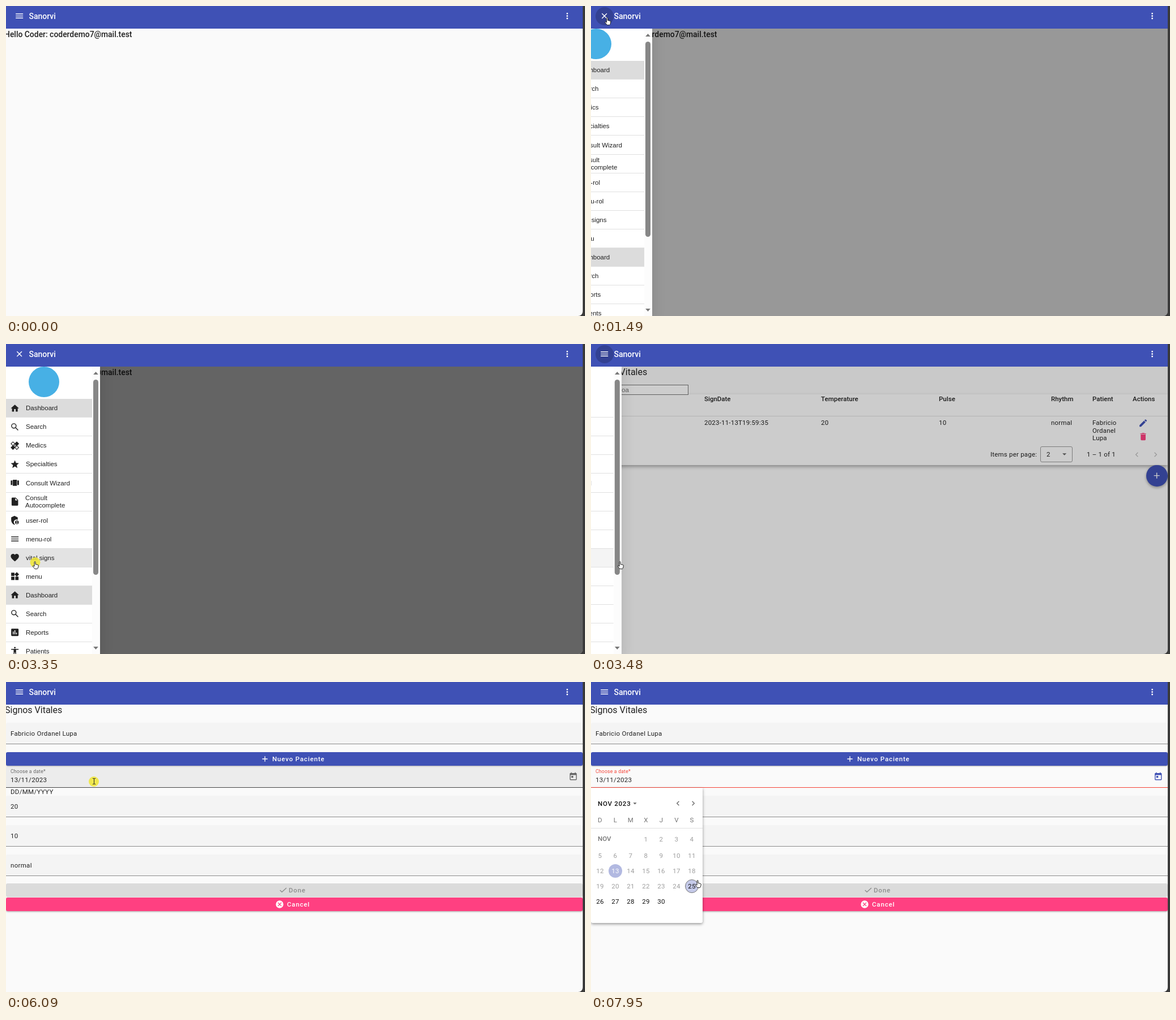
An HTML page for the animation above (8 s loop, 1022 by 548 pixels).

```html
<!DOCTYPE html>
<html lang="en">
<head>
<meta charset="utf-8">
<title>Vital signs</title>
<style>
html, body { margin: 0; width: 100%; height: 100%; overflow: hidden; background: #3a3a3a; }
#app { position: absolute; left: 0; top: 0; width: 1018px; height: 548px; overflow: hidden;
  background: #fafafa; border-radius: 0 0 8px 0; color: #212121; font: 11.5px/20px Roboto, sans-serif; }
#app div, #app span, #app svg, #cursor, #cursor svg { position: absolute; }
#app span { white-space: pre; }
.layer { left: 0; top: 0; width: 1018px; height: 548px; }
.bar { left: 0; top: 0; width: 1018px; height: 40px; background: #3f51b5; color: #fff; }
.ring { left: 8px; top: 2px; width: 32px; height: 32px; border-radius: 50%; background: rgba(0,0,0,.19); }
.med { font-weight: 500; }
.cell { letter-spacing: .2px; }
.form { letter-spacing: .3px; }
.btn { font-weight: 500; letter-spacing: .85px; }
.small { font-size: 8.6px; letter-spacing: .23px; }
.mid { transform: translateX(-50%); letter-spacing: .3px; }
#drawer { left: 0; top: 40px; width: 166px; height: 508px; background: #fff;
  box-shadow: 0 4px 20px 3px rgba(0,0,0,.1); font-family: "Liberation Sans", Arial, sans-serif; }
.row { left: 0; width: 152px; height: 32px; border-bottom: 1px solid #e0e0e0; }
.field { left: 0; width: 1018px; height: 37px; background: #f4f4f4; border-bottom: 1px solid #8c8c8c;
  border-radius: 3px 3px 0 0; }
.wide { left: 0; width: 1018px; height: 24px; border-radius: 3px; }
.card { left: 0; top: 89px; width: 1018px; height: 125px; background: #fefefe;
  box-shadow: 0 3px 6px rgba(0,0,0,.32); }
.filter { left: 24px; top: 72px; width: 146px; height: 16px; background: #fff; border: 1px solid #767676; }
.fab { left: 980px; top: 214px; width: 38px; height: 38px; border-radius: 50%; background: #3f51b5;
  box-shadow: 0 2px 5px rgba(0,0,0,.35); }
#edit { left: 956px; top: 127px; width: 43px; height: 25px; border-radius: 3px; overflow: hidden; background: #e4e7f4; }
#ripple { border-radius: 50%; background: #d6daef; }
#calendar { left: 0; top: 187px; width: 197px; height: 239px; background: #fff; border-radius: 0 0 3px 3px;
  box-shadow: 0 2px 5px rgba(0,0,0,.4); transform-origin: 0 0; }
.day { width: 24px; height: 24px; border-radius: 50%; box-sizing: border-box; }
#cursor { left: 0; top: 0; }
#cursor svg { overflow: visible; }
#halo { position: absolute; left: -9px; top: -8px; width: 18px; height: 18px; border-radius: 50%;
  background: rgba(240,230,50,.85); }
</style>
</head>
<body>
<div id="app"></div>
<div id="cursor"></div>
<script>
const $ = id => document.getElementById(id);
const BLUE = '#3f51b5', PINK = '#ff4081', RED = '#f44336', INK = '#212121';

// Icons on a 24-unit grid; those starting with "~" are stroked.
const ICONS = {
  menu: 'M3 6h18v2H3zM3 11h18v2H3zM3 16h18v2H3z',
  close: '~M6 6l12 12M6 18L18 6',
  more: 'M10 6a2 2 0 1 1 4 0 2 2 0 1 1-4 0M10 12a2 2 0 1 1 4 0 2 2 0 1 1-4 0M10 18a2 2 0 1 1 4 0 2 2 0 1 1-4 0',
  home: 'M10 20v-6h4v6h5v-8h3L12 3 2 12h3v8z',
  search: '~M4 9.5a5.5 5.5 0 1 1 11 0 5.5 5.5 0 1 1-11 0M14 14l6 6',
  healing: 'M12 6.3l4.7-4.7 5.7 5.7-4.7 4.7 4.7 4.7-5.7 5.7-4.7-4.7-4.7 4.7-5.7-5.7L6.3 12 1.6 7.3l5.7-5.7z' +
    'M3.7 7.3L7.3 11l3.6-3.7-3.6-3.6zM13 16.7l3.7 3.6 3.6-3.6-3.6-3.6zM9 11h2v2H9zM13 11h2v2h-2zM11 9h2v2h-2zM11 13h2v2h-2z',
  star: 'M12 17.3L18.2 21l-1.7-7L22 9.2l-7.2-.6L12 2 9.2 8.6 2 9.2 7.5 14 5.8 21z',
  carousel: 'M7 4h10v15H7zM2 6h4v11H2zM18 6h4v11h-4z',
  file: 'M6 2q-2 0-2 2v16q0 2 2 2h12q2 0 2-2V8l-6-6zM13 9V3.5L18.5 9z',
  shield: 'M11 1L3 5v6c0 5 3 10 8 12q1 0 1.5-1A6 6 0 0 1 19 11V5zM12.5 17a4.5 4.5 0 1 1 9 0 4.5 4.5 0 1 1-9 0M17 14a1.3 1.3 0 1 0 .1 0M14.5 19q2.5-2 5 0-2.5 2.5-5 0',
  heart: 'M12 21.3C5.4 15.4 2 12.3 2 8.5 2 3 9 1 12 5.1 15 1 22 3 22 8.5c0 3.8-3.4 6.9-10 12.8z',
  widgets: 'M13 13h8v8h-8zM3 13h8v8H3zM3 3h8v8H3zM16.7 1.7L22.3 7.3 16.7 13 11 7.3z',
  chart: 'M5 3h14q2 0 2 2v14q0 2-2 2H5q-2 0-2-2V5q0-2 2-2zM7 10v7h2v-7zM11 7v10h2V7zM15 13v4h2v-4z',
  person: 'M10 4a2 2 0 1 1 4 0 2 2 0 1 1-4 0M3 7h18v2h-6v13h-2v-6h-2v6H9V9H3z',
  edit: 'M3 17.3V21h3.8L17.8 9.9l-3.7-3.7zM20.7 7q.8-.7 0-1.4l-2.3-2.3q-.7-.7-1.4 0l-1.9 1.8 3.8 3.8z',
  bin: 'M6 7h12v12q0 2-2 2H8q-2 0-2-2zM5 4h3.5l1-1h5l1 1H19v2H5z',
  plus: '~M12 5v14M5 12h14',
  done: '~M4 12l5 5L21 6',
  cancel: 'M2 12a10 10 0 1 1 20 0 10 10 0 1 1-20 0M8 6.6L6.6 8l4 4-4 4L8 17.4l4-4 4 4 1.4-1.4-4-4 4-4L16 6.6l-4 4z',
  today: 'M5 3h1V1h2v2h8V1h2v2h1q2 0 2 2v14q0 2-2 2H5q-2 0-2-2V5q0-2 2-2zM5 8v11h14V8zM7 10h5v5H7z',
  down: 'M7 10l5 5 5-5z',
  up: 'M5 16l7-8 7 8z',
  dropup: 'M5 8l7 8 7-8z',
  prev: '~M15 6l-6 6 6 6',
  next: '~M9 6l6 6-6 6'
};

const text = (x, y, s, cls = '', css = '') =>
  `<span class="${cls}" style="left:${x}px;top:${y - 10}px;${css}">${s}</span>`;
const box = (cls, css, id = '', inner = '') => `<div id="${id}" class="${cls}" style="${css}">${inner}</div>`;
function icon(name, x, y, color = INK, size = 17.3, id = '') {
  const stroked = ICONS[name][0] === '~';
  const paint = stroked ? 'fill="none" stroke="currentColor" stroke-width="2"' : 'fill="currentColor" fill-rule="evenodd"';
  return `<svg id="${id}" viewBox="0 0 24 24" width="${size}" height="${size}" style="left:${x - size / 2}px;` +
    `top:${y - size / 2}px;color:${color}"><path ${paint} d="${ICONS[name].replace('~', '')}"/></svg>`;
}

const PATIENT = ['Fabricio', 'Ordanel', 'Lupa'];
const MENU = [['home', 'Dashboard'], ['search', 'Search'], ['healing', 'Medics'], ['star', 'Specialties'],
  ['carousel', 'Consult Wizard'], ['file', 'Consult\nAutocomplete'], ['shield', 'user-rol'], ['menu', 'menu-rol'],
  ['heart', 'vital signs'], ['widgets', 'menu'], ['home', 'Dashboard'], ['search', 'Search'],
  ['chart', 'Reports'], ['person', 'Patients']];
const ROW = 33.03;

const homePage = text(-3, 50, 'Hello Coder: coderdemo7@mail.test', 'med', 'font-size:13.9px');
const title = text(-2, 50, 'Signos Vitales', '', 'font-size:16px');

function tablePage() {
  const columns = [[8, 'ID', '3'], [200, 'SignDate', '2023-11-13T19:59:35'], [406, 'Temperature', '20'],
    [614, 'Pulse', '10'], [812, 'Rhythm', 'normal'], [885, 'Patient', ''], [956, 'Actions', '']];
  return title + text(-2, 81, 'Filter') + box('card', '') + box('filter', '') +
    text(26, 81, 'Ex. Noa', '', 'color:#757575;font-family:Liberation Sans,Arial,sans-serif') +
    box('', 'left:0;top:127px;width:1018px;height:1px;background:#dedede') +
    columns.map(([x, head, value]) => text(x, 97, head, 'med') + text(x, 139, value, 'cell')).join('') +
    PATIENT.map((s, i) => text(885, 139 + 13.6 * i, s, 'cell')).join('') +
    box('', '', 'edit', box('', '', 'ripple')) +
    icon('edit', 974.5, 139.5, BLUE) + icon('bin', 974.5, 164, PINK) +
    text(705, 195, 'Items per page:', 'cell') +
    box('', 'left:793px;top:181px;width:55px;height:26px;border:1px solid #9a9a9a;border-radius:3px') +
    text(804, 195, '2', 'cell') + icon('down', 836, 195, '#666') + text(875, 195, '1 – 1 of 1', 'cell') +
    icon('prev', 963, 195, '#bdbdbd', 15) + icon('next', 996, 195, '#bdbdbd', 15) +
    box('fab', '') + icon('plus', 999, 233, '#fff');
}

const FIELDS = [[72, PATIENT.join(' ')], [149, ''], [201, '20'], [253, '10'], [305, 'normal']];
function formPage() {
  return title +
    FIELDS.map(([y, s], i) => box('field', `top:${y}px`, 'field' + i) + text(8, y + 18.5, s, 'form')).join('') +
    box('wide', `top:124px;background:${BLUE};box-shadow:0 1px 2px rgba(0,0,0,.3)`) +
    icon('plus', 457, 136, '#fff', 16) + text(470, 136, 'Nuevo Paciente', 'btn', 'color:#fff') +
    `<span id="label" class="small" style="left:8px;top:148px">Choose a date*</span>` +
    text(8, 173, '13/11/2023', 'form') + icon('today', 1001.5, 167, '#666', 16.5, 'toggle') +
    text(8, 193.5, 'DD/MM/YYYY', 'form') +
    box('wide', 'top:356px;background:#dbdbdb') + icon('done', 489, 368, '#8c8c8c', 16) +
    text(499, 368, 'Done', 'btn', 'color:#8c8c8c') +
    box('wide', `top:381px;background:${PINK};box-shadow:0 1px 3px rgba(0,0,0,.35)`) +
    icon('cancel', 483, 392.5, '#fff', 16) + text(496, 392.5, 'Cancel', 'btn', 'color:#fff') +
    box('', '', 'calendar', calendar());
}

function calendar() {
  const rows = [91, 120, 147, 174, 201];
  let html = text(12, 27.5, 'NOV 2023', 'med', 'letter-spacing:.75px;color:#111') + icon('down', 77, 27, '#666', 15) +
    icon('prev', 153, 27.5, '#666', 15) + icon('next', 180, 27.5, '#666', 15) +
    box('', 'left:0;top:71px;width:197px;height:1px;background:#e0e0e0') +
    text(12, 89.5, 'NOV', 'med', 'color:#757575');
  [...'DLMXJVS'].forEach((d, i) => html += text(16 + 27 * i, 57, d, 'mid', 'color:#757575'));
  for (let d = 1; d <= 30; d++) {
    const x = 16 + 27 * ((d + 2) % 7), y = rows[Math.floor((d + 2) / 7)];
    if (d === 13) html += box('day', `left:${x - 12}px;top:${y - 12}px;background:#b2b9e1`);
    if (d === 25) html += box('day', `left:${x - 12}px;top:${y - 12}px;background:#c5cae9;border:1px solid #777`);
    html += text(x, y, d, 'mid', `color:${d === 13 ? '#fff' : d < 25 ? '#9e9e9e' : '#111'}`);
  }
  return html;
}

function drawer() {
  const rows = MENU.map(([name, label], i) => {
    const y = 57.4 + ROW * i, lines = label.split('\n');
    return box('row', `top:${y}px`, 'row' + i) + icon(name, 16, y + 16.1) +
      lines.map((s, k) => text(lines[1] ? 34 : 35, y + 16 + 13 * (k - (lines.length - 1) / 2), s)).join('');
  });
  return box('', 'left:40px;top:0;width:54px;height:54px;border-radius:50%;background:#47b0e5') + rows.join('') +
    box('', 'left:152px;top:0;width:14px;height:508px;background:#fcfcfc') +
    box('', 'left:154px;top:23px;width:9px;height:345px;border-radius:5px;background:#878787') +
    icon('up', 158.5, 11, '#777', 15) + icon('dropup', 158.5, 497, '#777', 15);
}

$('app').innerHTML = box('layer', '', 'home', homePage) + box('layer', '', 'table', tablePage()) +
  box('layer', '', 'form', formPage()) + box('layer', 'background:#000', 'backdrop') + box('', '', 'drawer', drawer()) +
  box('bar', '', '', box('ring', '', 'ring') + icon('menu', 24, 18, '#fff', 17.3, 'burger') +
    icon('close', 24, 18, '#fff', 17.3, 'cross') + text(40.5, 18, 'Sanorvi', 'med', 'font-size:14px') +
    icon('more', 991, 18, '#fff'));

const pointer = (id, x, y, d, width = 1) =>
  `<svg id="${id}" width="16" height="16" style="left:${x}px;top:${y}px"><path d="${d}" fill="#fff" stroke="#222" stroke-width="${width}"/></svg>`;
$('cursor').innerHTML = '<div id="halo"></div>' +
  pointer('arrow', 0, 0, 'M0 0v11l2.6-2.4 1.8 4 1.6-.7-1.8-3.9H8z', .9) +
  pointer('hand', -4.6, -1, 'M3.6 9.2V1.6a1 1 0 0 1 2 0V5.4l4.2 1q1.2.3 1 1.6l-.6 3q-.3 2-1.6 2.6H4.4Q3 11.6.9 9.2.4 8.2 1.5 8T3.6 9.2z') +
  pointer('beam', -2.5, -5, 'M0 .5h2l.5.5.5-.5h2M2.5 1v9M0 10.5h2l.5-.5.5.5h2');

const LOOP = 8000, OPEN = 1403, CLOSE = 3388, TO_FORM = 5120, FOCUS = 6240, BLUR = 6880, PICKER = 7160;
// time, x, y of the pointer's hot spot
const PATH = [[180, 806, 491], [840, 23, 19], [1100, 23, 19], [1180, 29, 21], [1960, 29, 21], [2350, 45, 300],
  [2520, 50, 430], [2760, 52, 373], [2820, 52, 378], [3020, 52, 378], [3090, 51.5, 385], [3560, 51.5, 385],
  [3750, 84, 375], [3880, 84, 375], [4680, 970, 136], [4750, 969.5, 140], [5130, 969.5, 140], [5480, 179, 236],
  [5560, 165, 236], [5760, 165, 236], [5880, 155, 175], [6330, 155, 175], [6800, 1001, 168], [7430, 1001, 168],
  [7950, 188.5, 351]];
const HALOS = [[1110, 1390], [3030, CLOSE], [4760, 5060], [5890, FOCUS], [6850, 7140]];
// time from which each pointer shape is used
const SHAPES = [[0, 'arrow'], [780, 'hand'], [3600, 'arrow'], [4620, 'hand'], [5140, 'arrow'], [5400, 'beam'],
  [6760, 'hand'], [7500, 'beam'], [7660, 'arrow'], [7880, 'hand']];

const clamp = v => Math.max(0, Math.min(1, v));
const ramp = (t, start, length) => clamp((t - start) / length);
const within = (t, a, b) => t >= a && t < b;
const show = (id, on) => $(id).style.visibility = on ? 'inherit' : 'hidden';

// cubic-bezier(.25, .8, .25, 1)
function swift(p) {
  let lo = 0, hi = 1;
  for (let i = 0; i < 20; i++) {
    const s = (lo + hi) / 2;
    if (.75 * s * (1 - s) + s ** 3 < p) lo = s; else hi = s;
  }
  return 2.4 * (1 - lo) ** 2 * lo + 3 * (1 - lo) * lo ** 2 + lo ** 3;
}

function pointerAt(t) {
  const i = PATH.findIndex(k => k[0] > t);
  if (i < 0) return PATH[PATH.length - 1].slice(1);
  const [t0, x0, y0] = PATH[Math.max(0, i - 1)], [t1, x1, y1] = PATH[i];
  const p = t1 > t0 ? clamp((t - t0) / (t1 - t0)) : 0, e = p * p * (3 - 2 * p);
  return [x0 + (x1 - x0) * e, y0 + (y1 - y0) * e];
}

function drawForm(t, y) {
  const focused = within(t, FOCUS, BLUR), invalid = t >= BLUR;
  FIELDS.forEach(([top], i) => {
    const hover = t < PICKER && t > 5400 && y >= top && y < top + 38, style = $('field' + i).style;
    style.background = hover ? '#ececec' : '#f4f4f4';
    style.borderBottomColor = hover ? '#444' : '#8c8c8c';
    style.boxShadow = 'none';
    if (i !== 1) return;
    if (focused) Object.assign(style, { background: '#e2e2e2', borderBottomColor: BLUE, boxShadow: 'inset 0 -1px ' + BLUE });
    if (invalid) Object.assign(style, { background: '#fafafa', borderBottomColor: RED });
  });
  $('label').style.color = focused ? BLUE : invalid ? RED : '#666';
  $('toggle').style.color = t >= PICKER ? BLUE : '#666';
  const p = ramp(t, PICKER, 120);
  $('calendar').style.opacity = p;
  $('calendar').style.transform = `scaleY(${.8 + .2 * p})`;
}

function rowColor(t, y, name, i) {
  const hover = within(t, 1960, 3800) && Math.floor((y - 97) / ROW) === i;
  if (t >= CLOSE) return hover ? '#f4f4f4' : '#fff';
  return name === 'home' ? '#dcdcdc' : hover ? '#e3e3e3' : '#fff';
}

function draw(t) {
  const [x, y] = pointerAt(t);
  const opened = swift(ramp(t, OPEN, 400)) - swift(ramp(t, CLOSE, 400));
  show('home', t < CLOSE);
  show('table', within(t, CLOSE, TO_FORM));
  show('form', t >= TO_FORM);
  show('drawer', opened > 0);
  $('drawer').style.transform = `translateX(${-166 * (1 - opened)}px)`;
  $('backdrop').style.opacity = .6 * opened;

  const expanded = within(t, OPEN, CLOSE);
  show('burger', !expanded);
  show('cross', expanded);
  $('ring').style.opacity = ramp(t, 1340, 80) - ramp(t, 1800, 80) + ramp(t, CLOSE, 60) - ramp(t, 4760, 80);
  MENU.forEach(([name], i) => $('row' + i).style.background = rowColor(t, y, name, i));

  show('edit', within(t, 4740, TO_FORM));
  const r = Math.min(45, Math.max(0, (t - 4790) * .29));
  Object.assign($('ripple').style, { left: 11 - r + 'px', top: 14 - r + 'px', width: 2 * r + 'px', height: 2 * r + 'px' });
  drawForm(t, y);

  show('cursor', t >= 180);
  $('cursor').style.transform = `translate(${x}px, ${y}px)`;
  const shape = SHAPES.filter(s => s[0] <= t).pop()[1];
  ['arrow', 'hand', 'beam'].forEach(id => show(id, id === shape));
  show('halo', HALOS.some(([a, b]) => within(t, a, b)));
}

const start = performance.now();
function tick() {
  draw((performance.now() - start) % LOOP);
  requestAnimationFrame(tick);
}
tick();
</script>
</body>
</html>
```
